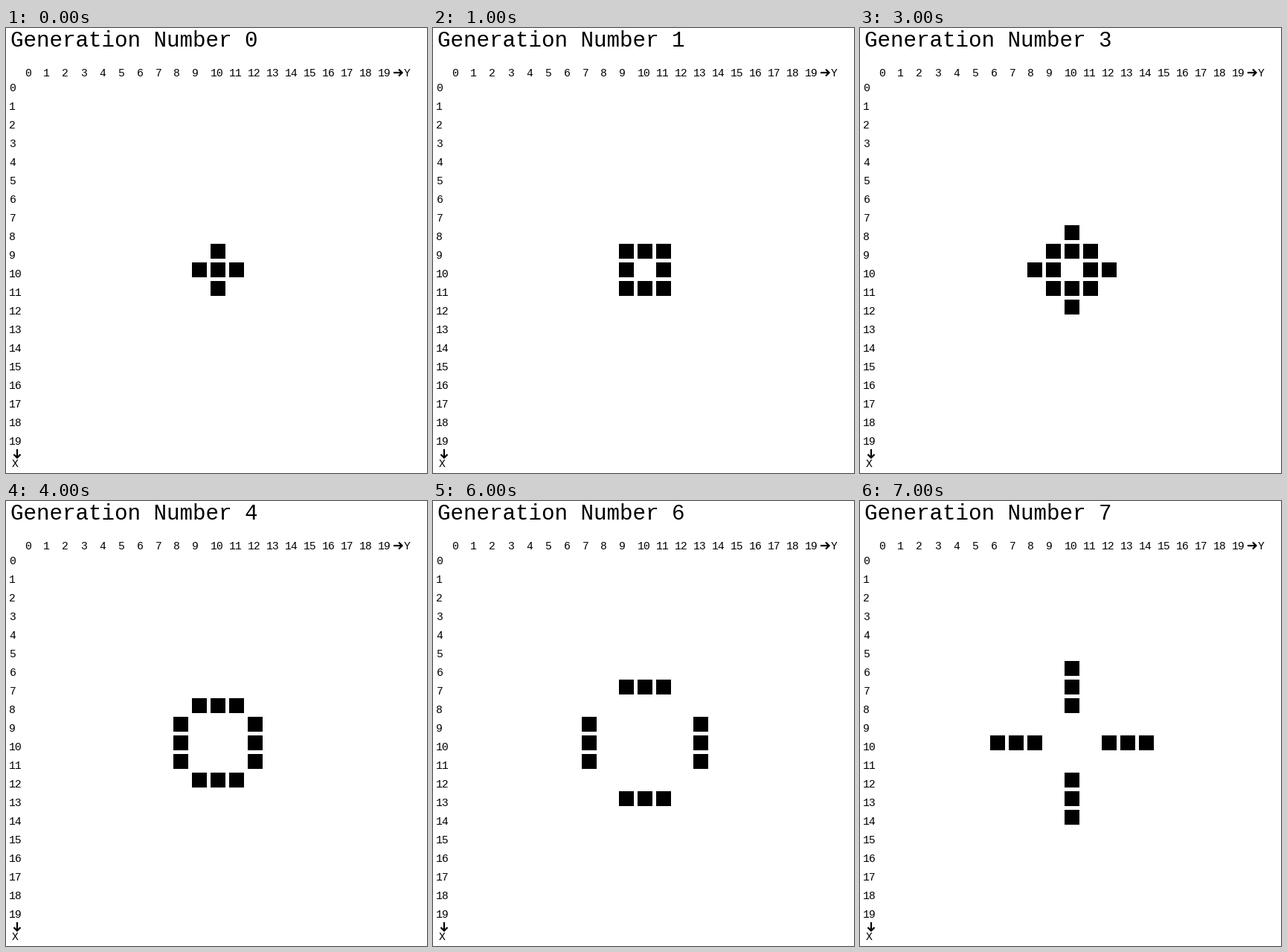
Write a matplotlib script that moves like this. It is 566 px wide and 598 px high and loops after 8000 ms.

```python
import numpy as np
import matplotlib.pyplot as plt
from matplotlib.animation import FuncAnimation
from matplotlib.collections import PolyCollection

W, H, DPI = 566, 598, 64
PX = 72 / DPI  # points per pixel
SIZE, PITCH, CELL = 20, 25, 20
GENERATIONS = 8

fig = plt.figure(figsize=(W / DPI, H / DPI), dpi=DPI, facecolor="white")
ax = fig.add_axes([0, 0, 1, 1])
ax.set_xlim(0, W)
ax.set_ylim(H, 0)
ax.axis("off")


def label(x, y, value, size=14.8):
    return ax.text(x, y, str(value), family="Liberation Mono",
                   size=size * PX, color="black", va="baseline", ha="left")


def arrow(x, y, dx, dy, length=12, head=4.5):
    """Arrow whose tip is at (x, y), pointing along the unit vector."""
    style = dict(color="black", lw=2.2 * PX, solid_capstyle="butt",
                 solid_joinstyle="miter")
    ax.plot([x - length * dx, x - dx], [y - length * dy, y - dy], **style)
    back = x - head * dx, y - head * dy
    ax.plot([back[0] - head * dy, x, back[0] + head * dy],
            [back[1] - head * dx, y, back[1] + head * dx], **style)


# Axis numbers, arrows and names
for n in range(SIZE):
    label(25.4 + PITCH * n, 65, n)
    label(4.4, 85 + PITCH * n, n)
arrow(532.5, 60, 1, 0)
arrow(15, 577.5, 0, 1)
label(535, 65, "Y")
label(7.5, 590, "X")

title = label(5.5, 25, "", size=29.2)
cells = PolyCollection([], facecolors="black", edgecolors="none",
                       linewidths=0, antialiaseds=False)
ax.add_collection(cells, autolim=False)


def step(grid):
    pad = np.pad(grid, 1)
    count = sum(pad[i:i + SIZE, j:j + SIZE]
                for i in range(3) for j in range(3)) - grid
    return ((count == 3) | ((grid == 1) & (count == 2))).astype(int)


start = np.zeros((SIZE, SIZE), int)
start[9:12, 10] = start[10, 9:12] = 1
history = [start]
while len(history) < GENERATIONS:
    history.append(step(history[-1]))


def square(row, col):
    x, y = 25 + PITCH * col, 65 + PITCH * row
    return [(x, y), (x + CELL, y), (x + CELL, y + CELL), (x, y + CELL)]


def update(n):
    title.set_text(f"Generation Number {n}")
    cells.set_verts([square(r, c) for r, c in np.argwhere(history[n])])
    return title, cells


anim = FuncAnimation(fig, update, frames=GENERATIONS, interval=1000,
                     repeat=True, repeat_delay=0, blit=False)
plt.show()
```
